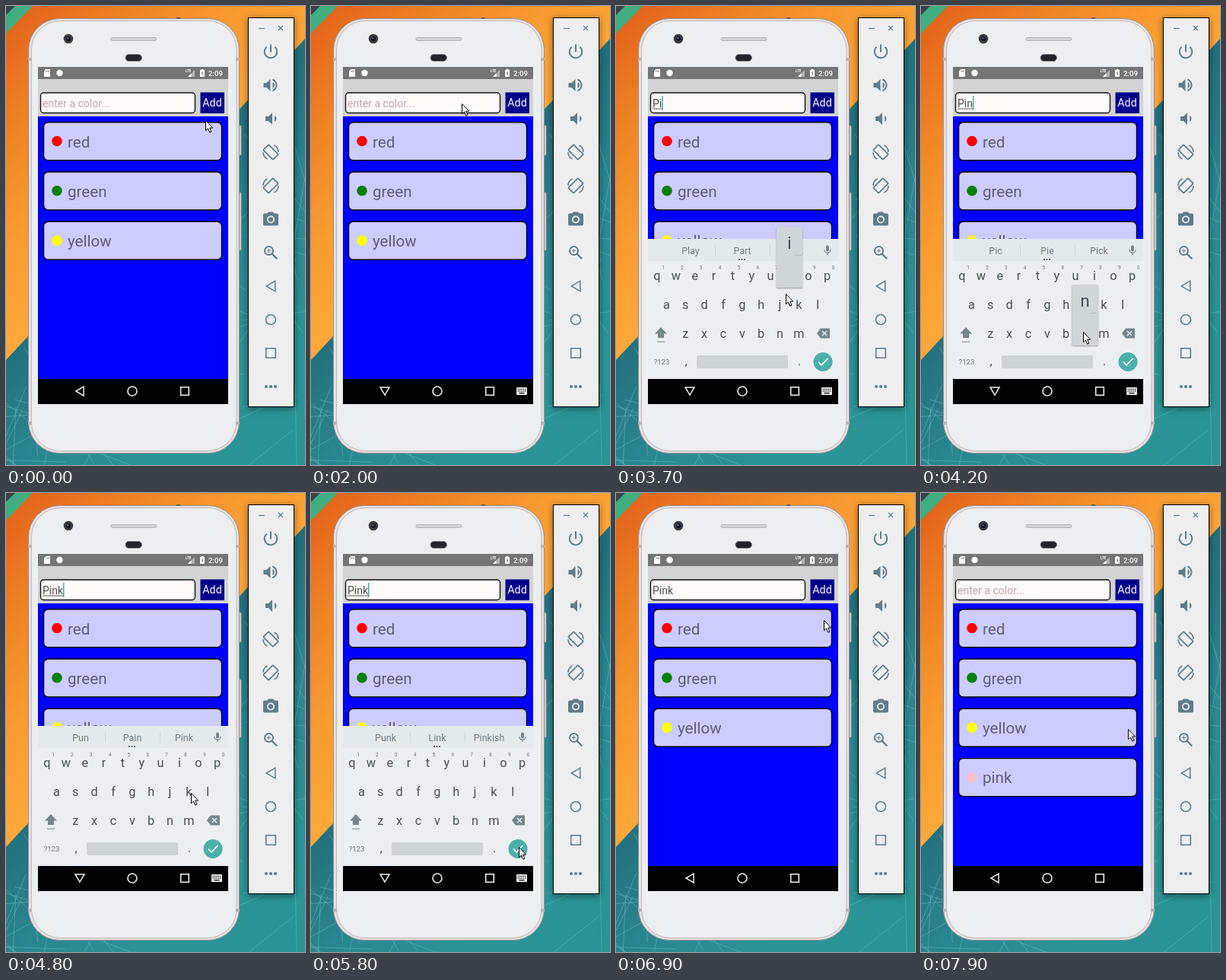
Recreate the animation shown at these times as an HTML page with a canvas. Size 393 by 603 pixels, loop 8 s.

```html
<!DOCTYPE html>
<html lang="en">
<head>
<meta charset="utf-8">
<title>Color list</title>
<style>
html, body { margin: 0; width: 100%; height: 100%; overflow: hidden; }
canvas { display: block; }
</style>
</head>
<body>
<canvas id="stage" width="393" height="603"></canvas>
<script>
const ctx = document.getElementById('stage').getContext('2d');
const LOOP = 8000, STEP = 100;
const FONT = 'Roboto, "Noto Sans", sans-serif';
const ICON = '#5f7d8b', KEY = '#435058', DIM = '#75868e', TEAL = '#4bb0aa';
const LEFT = 42, WIDTH = 250;
const CARDS = ['red', 'green', 'yellow', 'pink'];
const ROWS = ['qwertyuiop', 'asdfghjkl', 'zxcvbnm'];
const FOCUS = 2000, SUBMIT = 6300, ADD = 7300;

// pointer glides: leave, arrive, x, y
const GLIDES = [
  [0, 0, 262, 150], [100, 900, 198, 128], [2100, 2600, 275, 337], [3300, 3600, 226, 360],
  [3600, 3900, 213, 428], [4200, 4500, 243, 394], [4900, 5900, 274, 467],
  [6100, 6400, 277, 332], [6400, 7100, 272, 126], [7700, 7900, 272, 310]
];
const PRESSES = [[3300, 'P'], [3600, 'i'], [4100, 'n'], [4650, 'k']];
const HINTS = ['', 'Play Part Pick', 'Pic Pie Pick', 'Pun Pain Pink', 'Punk Link Pinkish'];

const clamp = v => Math.max(0, Math.min(1, v));
const smooth = v => v * v * (3 - 2 * v);
const progress = (t, from, to) => to > from ? clamp((t - from) / (to - from)) : 1;
const typedCount = t => PRESSES.filter(p => t >= p[0] + STEP).length;

function pointerAt(t) {
  let x = 0, y = 0;
  for (const [leave, arrive, toX, toY] of GLIDES) {
    if (t < leave) break;
    const k = smooth(progress(t, leave, arrive));
    x += (toX - x) * k;
    y += (toY - y) * k;
  }
  return [Math.round(x), Math.round(y)];
}

function keyAt(ch) {
  const row = ROWS.findIndex(r => r.includes(ch.toLowerCase()));
  const col = ROWS[row].indexOf(ch.toLowerCase());
  const indent = row + Math.max(0, row - 1);
  return [54 + (col + indent / 2) * 24.85, 354 + row * 38];
}

function rect(x, y, w, h, color) {
  ctx.fillStyle = color;
  ctx.fillRect(x, y, w, h);
}

function paint(fill, stroke, width = 1) {
  if (fill) { ctx.fillStyle = fill; ctx.fill(); }
  if (stroke) { ctx.strokeStyle = stroke; ctx.lineWidth = width; ctx.stroke(); }
}

function box(x, y, w, h, r, fill, stroke, width) {
  ctx.beginPath();
  ctx.roundRect(x, y, w, h, r);
  paint(fill, stroke, width);
}

function arc(x, y, r, from, to, fill, stroke, width) {
  ctx.beginPath();
  ctx.arc(x, y, r, from, to);
  paint(fill, stroke, width);
}

const disc = (x, y, r, ...style) => arc(x, y, r, 0, Math.PI * 2, ...style);

function poly(pts, fill, stroke, width, open) {
  ctx.beginPath();
  for (let i = 0; i < pts.length; i += 2) ctx.lineTo(pts[i], pts[i + 1]);
  if (!open) ctx.closePath();
  paint(fill, stroke, width);
}

const line = (pts, color, width = 1) => poly(pts, null, color, width, true);

function cross(x, y, r, color, width) {
  line([x - r, y - r, x + r, y + r], color, width);
  line([x - r, y + r, x + r, y - r], color, width);
}

// three-cornered arrow: turn 0 points down, 1 points left
function arrow(x, y, r, turn, color) {
  at(x, y, () => {
    ctx.rotate(turn * Math.PI / 2);
    poly([-r, -r * 0.85, r, -r * 0.85, 0, r * 0.85], null, color, 1.5);
  });
}

const square = (x, y, r, color) => box(x - r, y - r, r * 2, r * 2, 0, null, color, 1.6);

function text(str, x, y, size, color, align = 'left', weight = 400) {
  ctx.font = `${weight} ${size}px ${FONT}`;
  ctx.textAlign = align;
  ctx.fillStyle = color;
  ctx.fillText(str, x, y);
}

function at(x, y, draw) {
  ctx.save();
  ctx.translate(x, y);
  draw();
  ctx.restore();
}

function ramp(x0, y0, x1, y1, ...colors) {
  const g = ctx.createLinearGradient(x0, y0, x1, y1);
  colors.forEach((c, i) => g.addColorStop(i / (colors.length - 1), c));
  return g;
}

function randomizer(seed) {
  return () => (seed = (seed * 16807) % 2147483647) / 2147483647;
}

function wallpaper() {
  rect(0, 0, 393, 603, ramp(230, 230, 400, 400, '#23717e', '#2a8791', '#2a9496'));
  const rnd = randomizer(77);
  for (let i = 0; i < 60; i++) {
    const x = rnd() * 393, y = 603 - rnd() * (60 + x * 1.1);
    const angle = rnd() * Math.PI, r = 30 + rnd() * 60;
    const dx = Math.cos(angle) * r, dy = Math.sin(angle) * r;
    line([x - dx, y - dy, x + dx, y + dy], 'rgba(130,200,200,.4)');
  }
  poly([0, 0, 393, 0, 393, 43, 0, 465],
    ramp(15, 15, 232, 232, '#e4641b', '#ef8425', '#f99b30', '#fda83a'));
  poly([0, 0, 35, 0, 0, 36], '#3fae80');
  poly([0, 0, 12, 0, 0, 12], '#39434a');
}

function phone() {
  for (const [y, h] of [[157, 39], [245, 76]]) box(305.5, y, 3.5, h, 1.5, '#d9d4d5', '#a79fa1');
  box(29.5, 16.5, 277, 571, 41, '#e6e0e1', '#978d90', 1);
  box(33.5, 19.5, 269.5, 565, 38, '#eceef0', '#c3b6b9', 1);
  rect(224, 15, 5, 2, '#6b6566');
  for (const x of [29, 302]) for (const y of [68, 546]) rect(x, y, 5, 4, '#bcb4b6');
  disc(82, 43, 6.3, '#3b3d42');
  disc(82, 43, 3.2, '#15171c');
  disc(81.3, 42.3, 1.2, '#52679a');
  box(138, 41.5, 60, 4, 2, '#d3d4d6', '#b2b3b6');
  box(157, 63.5, 21.5, 9, 4.5, '#222429', '#85878c');
}

function power() {
  arc(0, 0, 8.3, -0.86, Math.PI + 0.86, null, ICON, 2);
  rect(-1, -9.5, 2, 10, ICON);
}

function speaker(x, loud) {
  poly([x, -3, x + 4, -3, x + 9, -8, x + 9, 8, x + 4, 3, x, 3], ICON);
  arc(x + 10, 0, 4.5, -1.1, 1.1, ICON);
  if (loud) arc(x + 9, 0, 8, -1.2, 1.2, null, ICON, 2);
}

function rotation(flip) {
  ctx.scale(flip, 1);
  ctx.rotate(Math.PI / 4);
  box(-9, -5, 18, 10, 1, null, ICON, 1.8);
  for (const turn of [0, Math.PI]) {
    ctx.rotate(turn);
    arc(0, 0, 10, -1.9, -0.8, null, ICON, 1.6);
  }
}

function camera() {
  poly([-3, -9.5, 3, -9.5, 5, -7, -5, -7], ICON);
  box(-10, -7.5, 20, 16, 2, ICON);
  disc(0, 0.5, 5, '#eeeeef');
  disc(0, 0.5, 3.2, ICON);
}

function magnifier() {
  disc(-2.5, -2.5, 5.5, null, ICON, 2);
  line([1.6, 1.6, 8.2, 8.2], ICON, 2.3);
  rect(-5, -3, 5, 1, ICON);
  rect(-3, -5, 1, 5, ICON);
}

function toolbar() {
  ctx.save();
  ctx.shadowColor = 'rgba(0,0,0,.45)';
  ctx.shadowBlur = 9;
  ctx.shadowOffsetY = 2;
  rect(318, 15, 61, 512, '#000');
  ctx.restore();
  rect(319, 16, 59, 510, '#eeeeef');
  line([332, 29.5, 340, 29.5], ICON, 1.2);
  cross(361, 29, 3, ICON, 1.2);
  [
    power, () => speaker(-9.5, true), () => speaker(-7, false),
    () => rotation(1), () => rotation(-1), camera, magnifier,
    () => arrow(0, 0, 6.8, 1, ICON), () => disc(0, 0, 6.5, null, ICON, 1.6),
    () => square(0, 0, 6.3, ICON),
    () => [-6, 0, 6].forEach(x => disc(x, 0, 2.1, ICON))
  ].forEach((icon, i) => at(348, 60 + i * 44, icon));
}

function statusBar() {
  rect(LEFT, 80, WIDTH, 16, '#757575');
  poly([52.5, 83, 58, 83, 58, 93, 50, 93, 50, 85.5], '#fff');
  for (let i = 0; i < 3; i++) rect(52.5 + i * 1.8, 84.5, 0.9, 2.2, '#757575');
  disc(70.5, 88, 4.2, '#fff');
  text('LTE', 236, 87, 4.5, '#fff', 'left', 700);
  poly([248, 84, 248, 93, 239, 93], 'rgba(255,255,255,.45)');
  poly([243.5, 88.5, 243.5, 93, 239, 93], '#fff');
  rect(255, 84, 6, 9, '#fff');
  rect(256.5, 83, 3, 1, '#fff');
  line([258.5, 86, 257.4, 88.5, 258.8, 88.5, 257.8, 91], '#757575');
  text('2:09', 266, 91.5, 9.6, '#fff', 'left', 500);
}

function caretOn(t) {
  const lastKey = 4800;
  if (t <= FOCUS || t >= SUBMIT) return false;
  return t < lastKey || (t - lastKey) % 1000 < 500;
}

function header(t) {
  rect(LEFT, 96, WIDTH, 49, '#d3d3d3');
  box(45.5, 114, 203, 26.5, 4, '#fffafa', '#111', 1.4);
  const typed = t < ADD ? PRESSES.slice(0, typedCount(t)).map(p => p[1]).join('') : '';
  if (typed) text(typed, 48, 133, 14, '#4c4a4a');
  else text('enter a color...', 48, 133, 14, '#bca6a6');
  const w = typed && ctx.measureText(typed).width;
  if (typed && t < SUBMIT) rect(48, 134.5, w, 1, '#5a5858');
  if (caretOn(t)) rect(48 + +w, 118, 1.4, 19, '#3aa59f');
  rect(255.5, 113.5, 31.5, 27.5, '#00008b');
  text('Add', 271, 132, 14.3, '#fff', 'center');
}

function list(t) {
  rect(LEFT, 145, WIDTH, 345, '#0000ff');
  CARDS.slice(0, t < ADD ? 3 : 4).forEach((name, i) => {
    const y = 152 + i * 65.3;
    box(49.5, y + 0.7, 234, 50, 6, '#ccccff', '#000', 1.4);
    disc(67, y + 25.5, 6.8, name);
    text(name, 81, y + 33.5, 20.6, 'rgba(0,0,0,.54)');
  });
}

function navBar(open) {
  const c = '#eee';
  rect(LEFT, 490, WIDTH, 33, '#000');
  arrow(97, 506, 6, open ? 0 : 1, c);
  disc(166, 506, 6, null, c, 1.6);
  square(235, 506, 5.3, c);
  if (!open) return;
  box(270, 501, 14, 10, 1, c);
  for (let i = 0; i < 10; i++)
    rect(271.5 + (i % 5) * 2.4, 502.8 + Math.floor(i / 5) * 2.5, 1.3, 1.3, '#000');
  rect(273.5, 508, 7, 1.2, '#000');
}

function hintStrip(hints) {
  rect(LEFT, 306, WIDTH, 29, '#e4e9ec');
  for (const x of [130, 202]) rect(x, 313, 1, 15, '#d0d6d9');
  hints.split(' ').forEach((h, i) => text(h, 98 + i * 68, 326, 12.5, '#6f7f87', 'center'));
  if (hints) for (const dx of [-3.5, 0, 3.5]) disc(165.5 + dx, 333, 1.1, KEY);
  box(276, 314.5, 4, 8, 2, DIM);
  arc(278, 320, 4.2, 0, Math.PI, null, DIM, 1.2);
  rect(277.4, 324, 1.2, 3, DIM);
}

function letters(upper) {
  for (const ch of ROWS.join('')) {
    const [x, y] = keyAt(ch);
    text(upper ? ch.toUpperCase() : ch, x, y + 5.5, 16.3, KEY, 'center');
  }
  [...ROWS[0]].forEach((ch, i) => text((i + 1) % 10, keyAt(ch)[0] + 8, 345.5, 6.6, '#68777f', 'center'));
}

function keyboard(t, alpha, dy) {
  const upper = t < PRESSES[0][0] + STEP;
  ctx.save();
  ctx.beginPath();
  ctx.rect(LEFT, 306, WIDTH, 186);
  ctx.clip();
  ctx.globalAlpha = alpha;
  ctx.translate(0, dy);
  rect(LEFT, 335, WIDTH, 155, '#eceff1');
  hintStrip(HINTS[typedCount(t - STEP)]);
  letters(upper);

  poly([59, 422, 67, 430.5, 63, 430.5, 63, 436, 55, 436, 55, 430.5, 51, 430.5], upper ? TEAL : DIM);
  rect(54, 440.5, 10, 1.4, '#98a5ab');
  poly([264, 430, 269, 423.5, 281, 423.5, 281, 436.5, 269, 436.5], DIM);
  cross(274, 430, 3, '#eceff1', 1.5);

  text('?123', 60, 471, 9.6, '#68777f', 'center');
  text(',', 92, 472, 16, KEY, 'center');
  box(106, 459, 120, 17, 2, '#ced3d6');
  text('.', 241, 472, 16, KEY, 'center');
  disc(272, 467.5, 12.5, TEAL);
  line([266, 467.5, 270, 471.8, 278.5, 463], '#fff', 1.7);
  ctx.restore();
}

function popup(t) {
  const hit = PRESSES.find(p => t >= p[0] && t < p[0] + 150);
  if (!hit) return;
  const [keyX, y] = keyAt(hit[1]), x = Math.min(keyX, 271);
  ctx.save();
  ctx.shadowColor = 'rgba(0,0,0,.35)';
  ctx.shadowBlur = 2;
  ctx.shadowOffsetY = 1;
  box(x - 17, y - 64, 34, 80, 1.5, '#d0d5d8');
  ctx.restore();
  text(hit[1], x, y - 35.5, 22, KEY, 'center');
  text('...', x + 11.5, y - 26, 10, '#829097', 'center');
}

function pointer([x, y]) {
  at(x, y, () =>
    poly([0.5, 0.5, 0.5, 13.7, 3.5, 10.9, 5.7, 16.1, 7.9, 15.2, 5.7, 10.1, 9.7, 10.1], '#fff', '#000'));
}

function draw(t) {
  wallpaper();
  phone();
  toolbar();
  statusBar();
  list(t);
  header(t);
  navBar(t >= FOCUS && t < SUBMIT);
  const shown = progress(t, 2100, 2500), gone = progress(t, SUBMIT, SUBMIT + 400);
  const alpha = shown * (1 - gone ** 1.3);
  if (alpha > 0) keyboard(t, alpha, 15 * (1 - shown) + 8 * gone);
  popup(t);
  pointer(pointerAt(t));
}

function tick(now) {
  draw(Math.floor((now % LOOP) / STEP) * STEP);
  requestAnimationFrame(tick);
}
draw(0);
requestAnimationFrame(tick);
</script>
</body>
</html>
```
